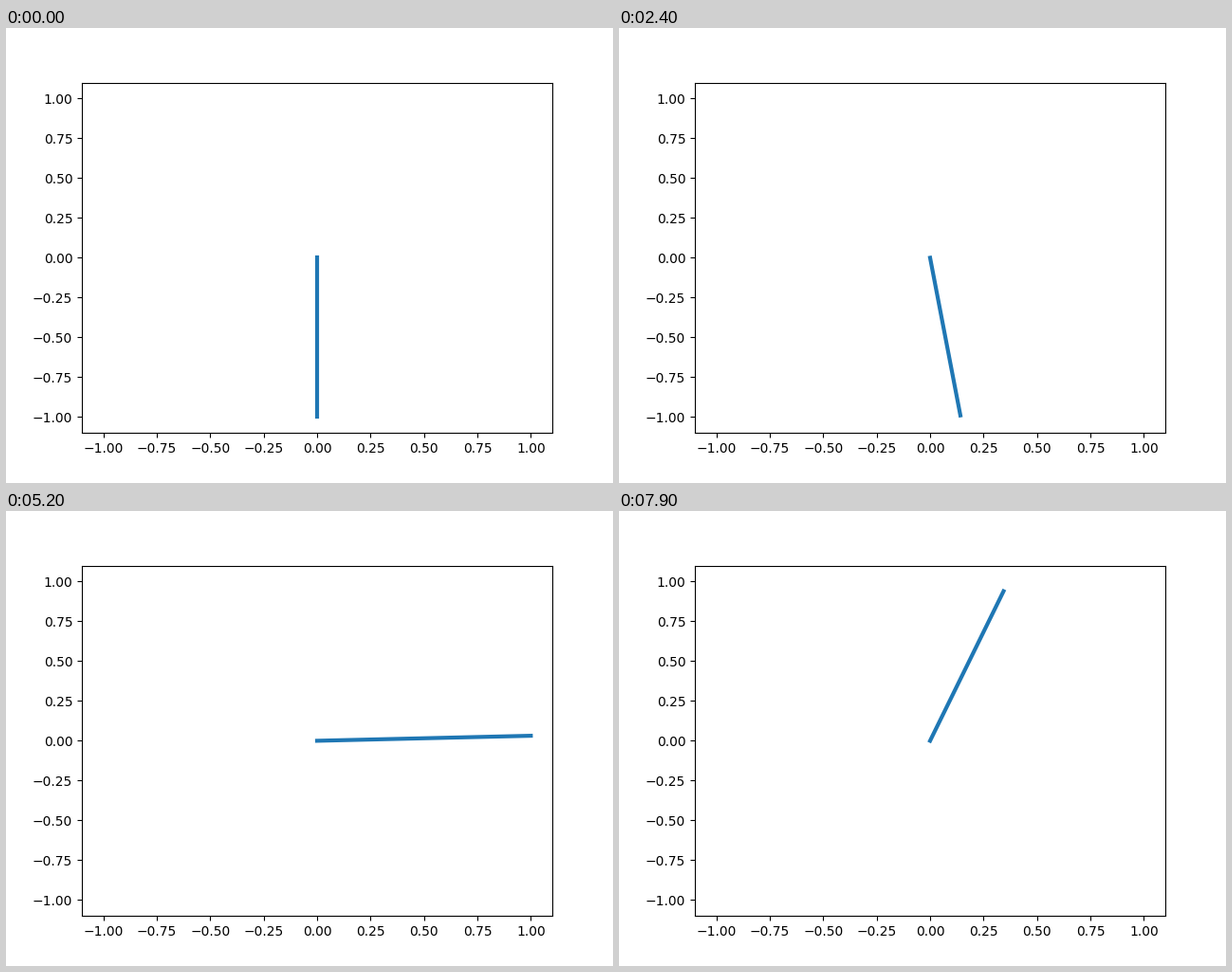
Animation, 640 px wide and 480 px high, one loop 8000 ms. Source, as a matplotlib script:

```python
import numpy as np
import matplotlib.pyplot as plt
from matplotlib.animation import FuncAnimation

STEPS = 20    # time steps in one swing from hanging to upright
FRAMES = 80
SKEW = 0.382  # makes the first half of the swing slightly faster


def swing_angles():
    """Angle from the hanging position at each step of one swing."""
    s = np.linspace(-1, 1, STEPS + 1)
    bell = 1 - s**2
    speed = bell * (1 - SKEW * s * bell)
    angle = np.concatenate(([0.0], np.cumsum(speed[:-1])))
    return np.pi * angle / angle[-1]


angles = swing_angles()

fig, ax = plt.subplots(figsize=(6.4, 4.8), dpi=100)
ax.set_xlim(-1.1, 1.1)
ax.set_ylim(-1.1, 1.1)
rod, = ax.plot([], [], lw=3)


def update(i):
    a = angles[i % len(angles)]
    rod.set_data([0, np.sin(a)], [0, -np.cos(a)])
    return rod,


anim = FuncAnimation(fig, update, frames=FRAMES, interval=100,
                     repeat=True, repeat_delay=0)
plt.show()
```
